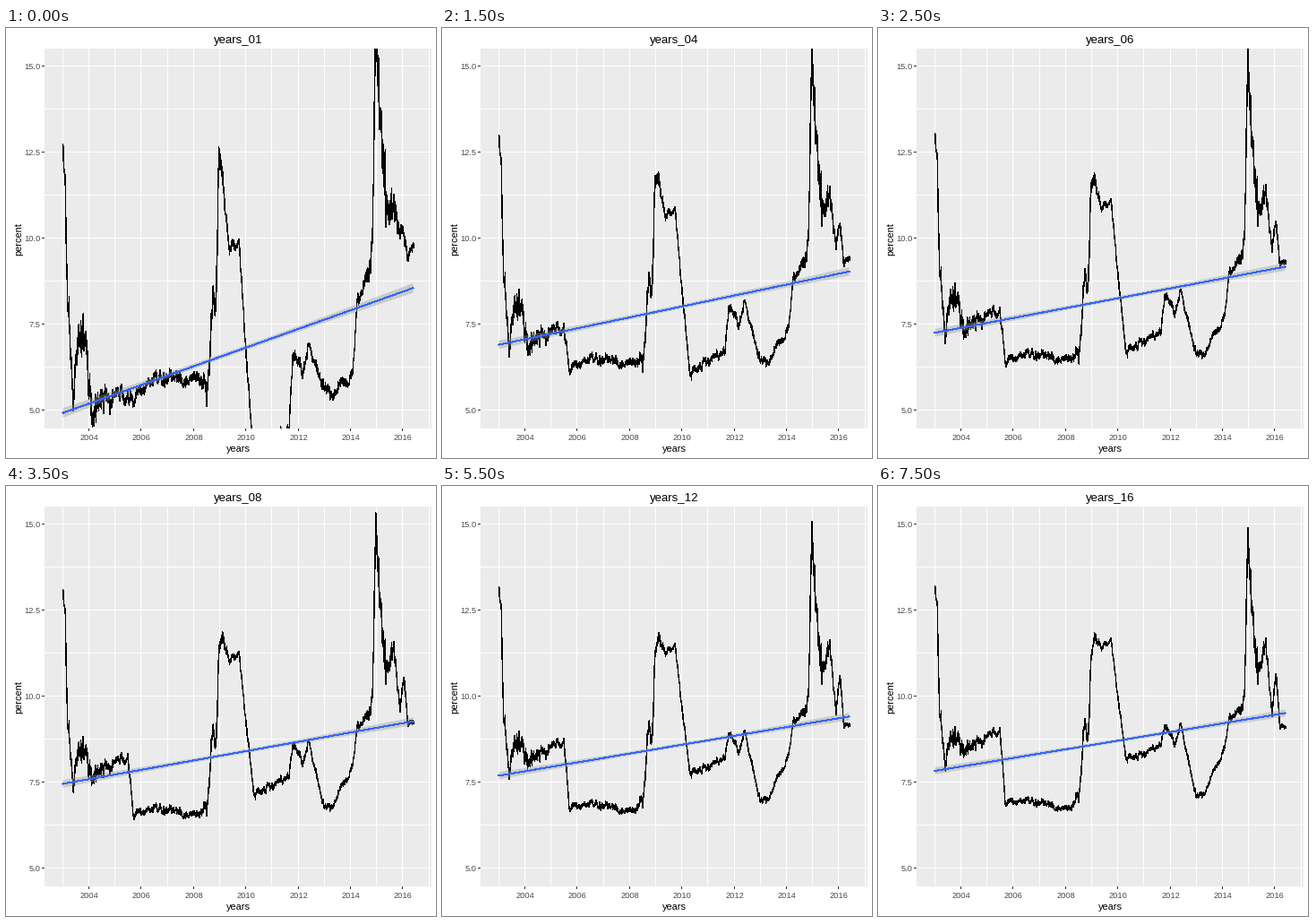
Recreate the animation shown at these times as a matplotlib script. Size 480 by 480 pixels, loop 8000 ms.

```python
import numpy as np
import matplotlib.pyplot as plt
from matplotlib.animation import FuncAnimation
from matplotlib.patches import Rectangle

SIZE, DPI = 480, 72
FRAMES, INTERVAL = 16, 500
LEFT, RIGHT, TOP, BOTTOM = 43, 474, 23, 446

plt.rcParams["font.family"] = "Liberation Sans"
plt.rcParams["path.simplify"] = False


def year_x(year):
    return 92 + 29.2 * (year - 2004)


def percent_y(value):
    return 426.5 - 38.42 * (value - 5)


# Turning points: year, one-year yield, sixteen-year yield.
KNOTS = np.array([
    (2003.0, 12.5, 13.1), (2003.1, 11.5, 12.6), (2003.18, 8.3, 9.6),
    (2003.4, 5.3, 8.0), (2003.6, 7.3, 8.9), (2003.85, 7.2, 8.8),
    (2004.15, 4.3, 8.2), (2004.4, 5.4, 8.6), (2005.5, 5.4, 9.0),
    (2005.7, 5.3, 6.9), (2006.3, 5.9, 7.0), (2008.2, 5.9, 6.7),
    (2008.55, 5.7, 7.3), (2008.7, 8.0, 9.2), (2008.9, 9.0, 9.1),
    (2008.97, 12.6, 11.1), (2009.12, 11.8, 11.8), (2009.35, 9.7, 11.4),
    (2009.75, 9.8, 11.6), (2010.3, 3.4, 8.2), (2010.9, 4.1, 8.3),
    (2011.65, 4.4, 8.6), (2011.8, 6.5, 9.1), (2012.2, 6.1, 8.6),
    (2012.4, 6.9, 9.2), (2013.0, 5.7, 7.1), (2013.3, 5.5, 7.2),
    (2014.1, 6.0, 8.5), (2014.25, 8.2, 9.4), (2014.85, 9.5, 9.8),
    (2014.97, 16.6, 14.8), (2015.3, 10.7, 10.4), (2015.65, 11.0, 11.6),
    (2015.9, 10.2, 9.5), (2016.05, 9.9, 10.6), (2016.2, 9.6, 9.2),
    (2016.42, 9.6, 9.0),
])

days = np.linspace(2003, 2016.42, 3350)
short, long_ = (np.interp(days, KNOTS[:, 0], KNOTS[:, k]) for k in (1, 2))


def bump(center, width):
    return np.exp(-((days - center) / width) ** 2)


# Mean-reverting daily jitter, stronger in turbulent years.
rng = np.random.default_rng(12)
noise = np.zeros(days.size)
for i, shock in enumerate(rng.normal(0, 0.36, days.size)):
    noise[i] = 0.93 * noise[i - 1] + shock
noise += rng.normal(0, 0.35, days.size)
jitter = noise * (0.055 + 0.12 * bump(2003.8, 0.9)
                  + 0.14 * bump(2008.8, 0.35) + 0.22 * bump(2015.2, 0.5))


def series(m):
    t = (np.log(m) / np.log(16)) ** 0.86
    return short + (long_ - short) * t + jitter * (2 - t)


def trend(m):
    start = 8.645 - 3.715 * m ** -0.55
    end = 8.56 + 0.345 * np.log(m)
    s = np.linspace(-1, 1, 80)
    half = (0.07 - 0.0065 * np.log(m)) * np.sqrt(1 + 3 * s**2)
    return start + (end - start) * (s + 1) / 2, half


fig = plt.figure(figsize=(SIZE / DPI, SIZE / DPI), dpi=DPI, facecolor="white")
ax = fig.add_axes([0, 0, 1, 1])
ax.set_xlim(-0.5, SIZE - 0.5)
ax.set_ylim(SIZE - 0.5, -0.5)
ax.axis("off")


def box(x0, y0, x1, y1, color):
    """Fill whole pixels from (x0, y0) to (x1, y1) inclusive."""
    return ax.add_patch(Rectangle((x0 - 0.5, y0 - 0.5), x1 - x0 + 1, y1 - y0 + 1,
                                  fc=color, lw=0, zorder=1))


def label(x, y, text, size, color="black", **kw):
    return ax.text(x, y, text, fontsize=size, color=color, **kw)


panel = box(LEFT, TOP, RIGHT, BOTTOM, "#EBEBEB")

for year in range(2003, 2018):
    x = round(year_x(year))
    box(x, TOP, x, BOTTOM, "white")
    if year % 2 == 0:
        box(x, BOTTOM + 1, x, BOTTOM + 3, "#333333")
        label(x, 460, str(year), 9.2, "#4D4D4D", ha="center")

for step in range(9):
    value = 5 + 1.25 * step
    y = round(percent_y(value))
    box(LEFT, y, RIGHT, y, "white")
    if step % 2 == 0:
        box(LEFT - 3, y, LEFT - 1, y, "#333333")
        label(38, y + 3.5, f"{value:.1f}", 9.2, "#4D4D4D", ha="right")

label(258.5, 472.5, "years", 11, ha="center")
label(14, 235, "percent", 11, ha="center", va="center", rotation=90)
title = label(258.5, 16.5, "", 13.2, ha="center")

trend_x = np.linspace(63, 454, 80)
curve, = ax.plot([], [], color="black", lw=0.4, aa=False, zorder=2)
band, = ax.fill([0, 0, 0], [0, 0, 0], fc="#999999", alpha=0.4, lw=0, zorder=3)
fit, = ax.plot([], [], color="#3366FF", lw=1, aa=False, zorder=4)
for artist in (curve, band, fit):
    artist.set_clip_path(panel)


def update(frame):
    m = frame + 1
    title.set_text(f"years_{m:02d}")
    curve.set_data(year_x(days), percent_y(series(m)))
    mean, half = trend(m)
    fit.set_data(trend_x, percent_y(mean))
    edges = percent_y(np.r_[mean + half, (mean - half)[::-1]])
    band.set_xy(np.column_stack([np.r_[trend_x, trend_x[::-1]], edges]))
    return title, curve, band, fit


anim = FuncAnimation(fig, update, frames=FRAMES, interval=INTERVAL,
                     repeat=True, repeat_delay=0)
plt.show()
```
